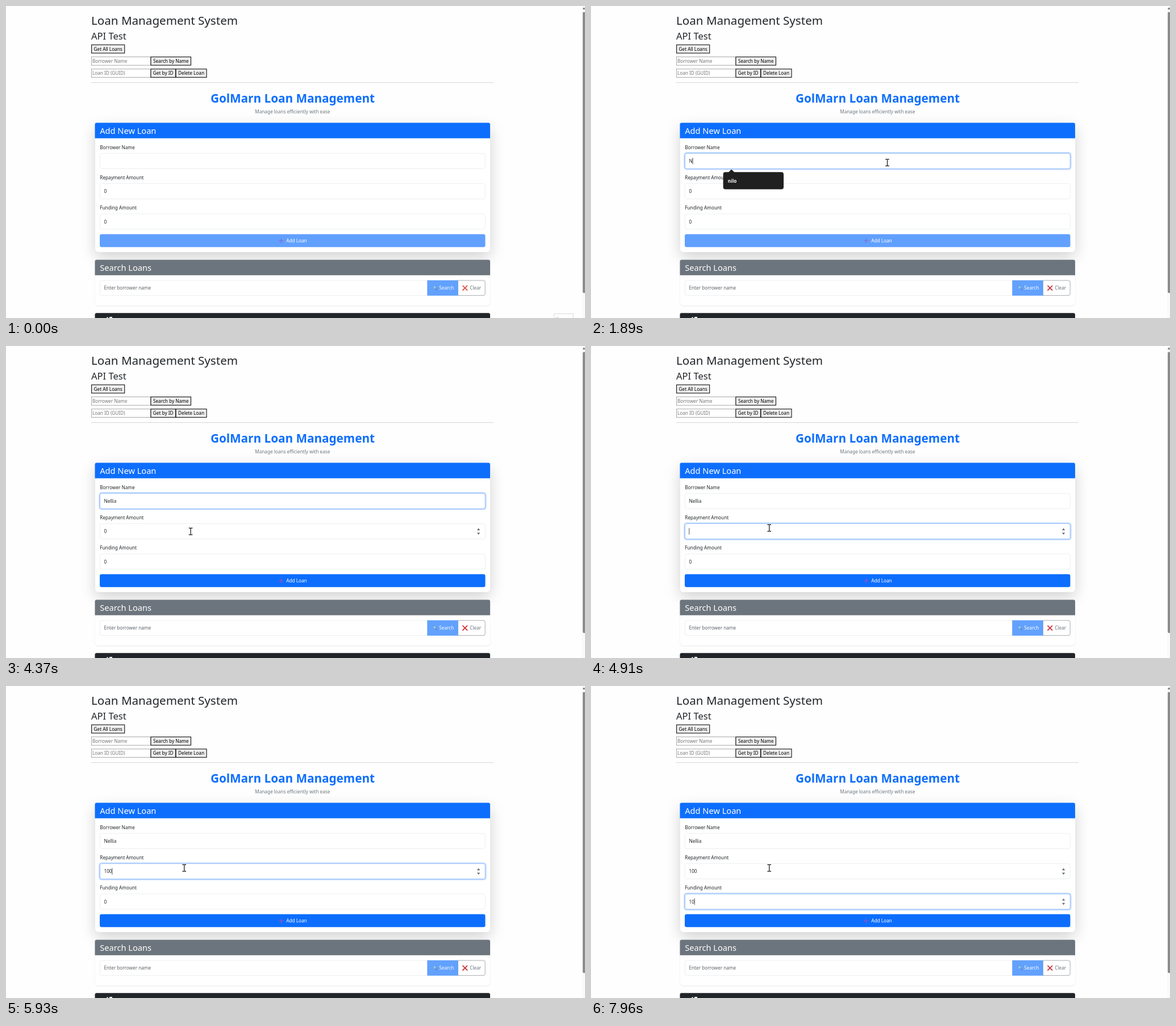
These frames come from a looping animation (1019 px wide and 549 px high, 8 s). An HTML page:

```html
<!DOCTYPE html>
<html lang="en">
<head>
<meta charset="utf-8">
<title>Loan Management System</title>
<style>
html, body { margin: 0; width: 100%; height: 100%; overflow: hidden; background: #fefefe; }
.card { position: absolute; left: 156.5px; width: 695.5px; background: #fff; border-radius: 3px 3px 6px 6px; }
.add { top: 205.5px; height: 227.5px; box-shadow: 0 8.7px 26px rgba(0,0,0,.175); }
.find { top: 446.3px; height: 80.7px; box-shadow: 0 1px 2.5px rgba(0,0,0,.09); }
svg { position: absolute; left: 0; top: 0; width: 1019px; height: 549px; overflow: hidden; }
text { font-family: "Noto Sans", "Open Sans", sans-serif; font-size: 8.2px; fill: #212529; white-space: pre; }
</style>
</head>
<body>
<div class="card add"></div>
<div class="card find"></div>
<svg id="stage" viewBox="0 0 1019 549"></svg>
<script>
const LOOP = 8000;
const BLUE = '#0d6efd', GREY = '#6c757d', INK = '#212529';
const stage = document.getElementById('stage');

function add(tag, attrs, parent = stage) {
  const el = document.createElementNS('http://www.w3.org/2000/svg', tag);
  for (const k in attrs) el.setAttribute(k, attrs[k]);
  parent.appendChild(el);
  return el;
}
const box = (x, y, r, b, attrs = {}, parent) =>
  add('rect', { x, y, width: r - x, height: b - y, fill: 'none', ...attrs }, parent);
const path = (d, attrs = {}, parent) => add('path', { d, ...attrs }, parent);
function label(str, x, y, css = '', parent) {
  const el = add('text', { x, y, style: css }, parent);
  el.textContent = str;
  return el;
}
const mid = 'text-anchor:middle;';
const show = (el, on) => el.setAttribute('visibility', on ? 'visible' : 'hidden');
const ramp = (t, start, len = 150) => Math.min(1, Math.max(0, (t - start) / len));

// Top test panel
label('Loan Management System', 150, 33, 'font-size:20.6px;font-weight:500');
label('API Test', 150, 59.3, 'font-size:16.5px;font-weight:500');

function plainButton(str, x, y, r) {
  box(x, y, r, y + 14.6, { fill: '#efefef', stroke: '#111', 'stroke-width': 1.1 });
  label(str, (x + r) / 2, y + 10.5, mid + 'fill:#000');
}
function plainInput(str, y) {
  box(150.4, y, 254.5, y + 14.6, { fill: '#fff', stroke: '#858585', 'stroke-width': .7 });
  label(str, 152, y + 10.5, 'fill:#757575');
}
plainButton('Get All Loans', 150.6, 68.3, 208.7);
plainInput('Borrower Name', 89.6);
plainButton('Search by Name', 254.9, 89.6, 325.4);
plainInput('Loan ID (GUID)', 110.9);
plainButton('Get by ID', 254.9, 110.9, 298.4);
plainButton('Delete Loan', 299, 110.9, 353);
box(150, 134.3, 858, 135.2, { fill: '#d0d1d2' });

label('GolMarn Loan Management', 504.5, 170, mid + `font-size:20.7px;font-weight:700;fill:${BLUE}`);
label('Manage loans efficiently with ease', 504.3, 188.8, mid + `fill:${GREY}`);

// Card headers
function header(str, y, color) {
  path(`M156.5 ${y + 27.2}V${y + 3}q0-3 3-3H849q3 0 3 3V${y + 27.2}z`, { fill: color });
  label(str, 165.3, y + 19.7, 'font-size:14.6px;font-weight:500;fill:#fff');
}
header('Add New Loan', 205.5, BLUE);
header('Search Loans', 446.5, GREY);
header('', 540.2, INK);
box(177, 547.6, 180, 549, { fill: '#d8d8d8' });
box(182, 547, 187, 549, { fill: '#f2f2f2' });

// Form fields
function field(name, y, text, keys, focus, blur) {
  label(name, 165.3, y - 7.7);
  const ring = box(164.3, y - 1.1, 844.5, y + 28, {
    rx: 4.2, stroke: BLUE, 'stroke-opacity': .25, 'stroke-width': 2.2 });
  const back = box(165.4, y, 843.3, y + 26.9, { rx: 3.2, fill: '#fff', stroke: '#dee2e6', 'stroke-width': .6 });
  const edge = box(165.4, y, 843.3, y + 26.9, { rx: 3.2, stroke: '#86b7fe', 'stroke-width': .8 });
  const mark = box(172.3, y + 7.5, 177.5, y + 20, { fill: '#0078d7' });
  const value = label('', 172.5, y + 16.6);
  const caret = box(0, y + 7.8, .7, y + 19.2, { fill: '#111' });
  const spin = path(`M828.9 ${y + 11.6}l2.7-3.6 2.7 3.6zM828.9 ${y + 15.8}l2.7 3.6 2.7-3.6z`, { fill: '#666b74' });
  return { y, ring, back, edge, mark, value, caret, spin, text, keys, focus, blur };
}
// Each key entry: time, characters shown; -1 means the untouched zero
const fields = [
  field('Borrower Name', 259.3, 'Nellia',
    [[1240, 0], [1830, 1], [2170, 2], [2310, 3], [2580, 4], [2770, 5], [3370, 6]], 1250, 4530),
  field('Repayment Amount', 312.6, '100',
    [[4530, -1], [4910, 0], [5320, 1], [5780, 2], [5930, 3]], 4530, 6310),
  field('Funding Amount', 365.9, '10',
    [[6310, -1], [7430, 1], [7960, 2]], 6310, 1e5),
];

// Add button
const addFill = box(165, 401.5, 843.5, 424.3, { rx: 3.3, fill: BLUE });
const plus = path('M480.2 413.2h8M484.2 409.2v8', { stroke: '#9a4fc8', 'stroke-width': 1.3 });
label('Add Loan', 511.4, 416.4, mid + 'fill:#fff');

// Search row
box(165.4, 482.9, 742, 509.4, { rx: 3.2, fill: '#fff', stroke: '#dee2e6', 'stroke-width': .6 });
label('Enter borrower name', 172.5, 499.3, 'fill:#5c6167');
path('M795.5 482.9H840q3.2 0 3.2 3.2v20q0 3.3-3.2 3.3H795.5z', { fill: '#fff', stroke: GREY, 'stroke-width': .6 });
box(741.3, 482.6, 795.6, 509.7, { fill: '#62a1fe' });
add('circle', { cx: 754.3, cy: 495, r: 2.6, fill: '#8fc8f0', stroke: '#6f93b8', 'stroke-width': .8 });
path('M756.3 497.2l2.5 2.7', { stroke: '#6d7fa8', 'stroke-width': 1.4 });
label('Search', 775.3, 499.4, mid + 'fill:#fff');
const cross = path('M804 492.4l7.6 7.6M811.6 492.4l-7.6 7.6', { 'stroke-width': 1.8, 'stroke-linecap': 'round' });
label('Clear', 826.2, 499.4, mid + `fill:${GREY}`);

// Scrollbar
box(1013.8, 0, 1019, 549, { fill: '#fafafa' });
box(1015, 10.5, 1019.5, 505, { rx: 2, fill: '#8b8b8b' });
path('M1014.8 6l2.3-4 2.3 4z', { fill: '#777' });

// Corner notice
const notice = add('g', {});
box(964.8, 541.6, 998.2, 560, { fill: '#fff', stroke: '#d2d2d2', 'stroke-width': .8 }, notice);
label('Screen', 981.5, 553.6, mid + 'fill:#bbb', notice);

// Autofill popup
const popup = add('g', {});
path('M241.5 293l5.7-5.6 5.7 5.6z', { fill: '#202020' }, popup);
box(232.6, 292.2, 339, 322.4, { rx: 4, fill: '#202020' }, popup);
label('nilo', 240.8, 311, 'fill:#fff;font-weight:600', popup);

// Pointer
const beam = add('g', {});
path('M-3.3-5.9H-.9L0-5.4.9-5.9H3.3M0-5.4V5.4M-3.3 5.9H-.9L0 5.4.9 5.9H3.3',
  { fill: 'none', stroke: '#111', 'stroke-width': 1.2 }, beam);
const arrow = add('g', {});
path('M0 0V10.6L2.5 8.3 4.2 12.2 5.8 11.5 4.1 7.7H7.4z',
  { fill: '#fff', stroke: '#111', 'stroke-width': .7 }, arrow);
const steps = [
  [390, 858, 497], [460, 770, 440], [530, 660, 370], [600, 597, 328.5],
  [800, 592, 326], [870, 572, 314], [940, 550, 299], [1010, 532, 285], [1080, 521.5, 275.5],
  [3910, 512, 280], [3970, 485, 294], [4040, 448, 318], [4110, 412, 337], [4170, 378, 346],
  [4240, 350, 342], [4300, 334, 332], [4370, 325, 326.3], [4440, 313.7, 320.2],
];
const lastBefore = (rows, t) => rows.filter(r => r[0] <= t).pop();
const inside = (p, f) => p && p[1] > 165 && p[1] < 843 && p[2] > f.y && p[2] < f.y + 27;

function drawField(f, t, pos, numeric) {
  const glow = ramp(t, f.focus) - ramp(t, f.blur);
  f.ring.setAttribute('opacity', glow);
  f.edge.setAttribute('opacity', glow);
  const key = lastBefore(f.keys, t);
  const count = key ? key[1] : -1;
  f.value.textContent = count >= 0 ? f.text.slice(0, count) : numeric ? '0' : '';
  const focused = t >= f.focus && t < f.blur;
  const picked = f === fields[2] && focused && count < 0;
  show(f.mark, picked);
  f.value.style.fill = picked ? '#fff' : INK;
  const blink = key && (t - key[0]) % 1060 < 530;
  show(f.caret, focused && blink && !picked);
  f.caret.setAttribute('x', 172.5 + (f.value.textContent ? f.value.getComputedTextLength() : 0));
  show(f.spin, numeric && (focused || inside(pos, f)));
}

function draw(t) {
  const pos = lastBefore(steps, t);
  fields.forEach((f, i) => drawField(f, t, pos, i > 0));

  const ready = ramp(t, 1950) - ramp(t, 4910) + ramp(t, 5430, 140);
  addFill.setAttribute('opacity', .65 + .35 * ready);
  plus.setAttribute('opacity', .65 + .35 * ready);
  cross.setAttribute('stroke', t < 390 ? '#dc5a46' : '#cc3a42');

  show(notice, t < 70);
  popup.setAttribute('opacity', ramp(t, 1800, 80) - ramp(t, 2170, 80));

  const text = fields.some(f => inside(pos, f));
  show(beam, pos && text);
  show(arrow, pos && !text);
  if (pos) (text ? beam : arrow).setAttribute('transform', `translate(${pos[1]} ${pos[2]})`);
}

function tick() {
  draw(performance.now() % LOOP);
  requestAnimationFrame(tick);
}
tick();
</script>
</body>
</html>
```
